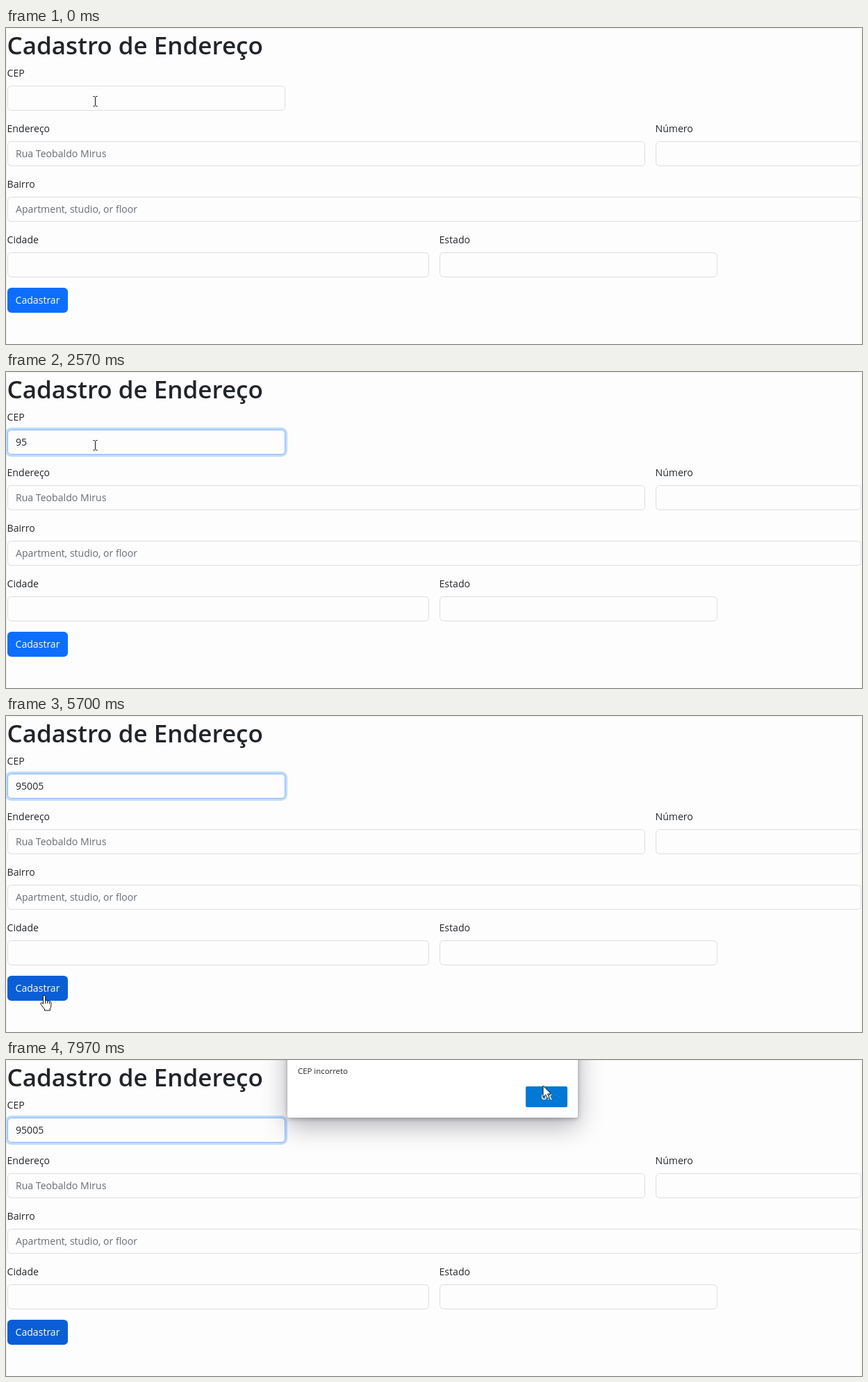
An HTML page for the animation above (8 s loop, 1232 px wide and 455 px high).

```html
<!DOCTYPE html>
<html lang="pt-BR">
<head>
<meta charset="utf-8">
<title>Cadastro de Endereço</title>
<style>
  html, body { margin: 0; width: 100%; height: 100%; overflow: hidden; background: #fdfdfd; }
  svg { position: absolute; left: 0; top: 0; }
  text { font: 14.1px "Open Sans", "Noto Sans", sans-serif; fill: #212529; }
  .title { font-size: 35px; font-weight: 600; }
  .hint { fill: #666d74; }
  .light { fill: #fff; }
  .field { fill: #fdfdfd; stroke: #dcdedf; }
  #dialog {
    position: absolute; left: 405px; top: -40px; width: 418px; height: 123px;
    background: #fff; border-radius: 3px;
    box-shadow: 0 12px 36px rgba(0, 0, 30, .3), 0 2px 6px rgba(0, 0, 0, .28);
  }
  #dialog svg { top: 40px; }
  #dialog text { font-size: 11.4px; }
  #dialog .light { font-size: 10.6px; font-weight: 700; }
</style>
</head>
<body>
<svg id="page" width="1232" height="455"></svg>
<div id="dialog">
  <svg width="418" height="83">
    <text x="15" y="20">CEP incorreto</text>
    <rect x="343" y="38" width="60" height="30" rx="2" fill="#0078d4"/>
    <text class="light" x="373" y="57" text-anchor="middle">OK</text>
  </svg>
</div>
<svg width="1232" height="455">
  <g id="cursor" stroke-linejoin="round">
    <path id="beam" d="M-3-7H-1L0-6 1-7H3M0-6V6M-3 7H-1L0 6 1 7H3" fill="none" stroke="#111"/>
    <path id="arrow" d="M0 0V16.5L3.8 12.9 6.3 18.6 9 17.4 6.5 11.9H11.6Z" fill="#fff" stroke="#111"/>
    <g id="hand" stroke="#111">
      <path d="M-1.5 11.5V.8a1.6 1.6 0 0 1 3.2 0V7.2q0-1.2 1.5-1t1.5 1.6q0-1 1.4-.8t1.4 1.6q.2-.9 1.3-.6t1.1 1.6V14q0 2.5-1.5 4.2V21H.5V19Q-1.5 17-3 14.5L-5 11.8q-.6-1.6.8-1.9t2.7 1.6z" fill="#fff"/>
      <path d="M1.7 7V11M4.7 8V11M7.5 8.6V11.5" fill="none"/>
    </g>
  </g>
</svg>
<script>
const LOOP = 8000, FOCUS = 500, ALERT = 6050;
const $ = id => document.getElementById(id);

// label, x, y, width, placeholder
const fields = [
  ['CEP', 2.5, 83.5, 399, ''],
  ['Endereço', 2.5, 163.5, 917, 'Rua Teobaldo Mirus'],
  ['Número', 935.5, 163.5, 295, ''],
  ['Bairro', 2.5, 243.5, 1228, 'Apartment, studio, or floor'],
  ['Cidade', 2.5, 323.5, 606, ''],
  ['Estado', 624.5, 323.5, 399, '']
];
const HEIGHT = 35;
const text = (x, y, s, cls = '') => `<text x="${x}" y="${y}" class="${cls}">${s}</text>`;

$('page').innerHTML =
  '<rect x=".5" y=".5" width="1230" height="480" rx="6" fill="#fdfdfd" stroke="#f1f0e2"/>' +
  text(1.5, 38, 'Cadastro de Endereço', 'title') +
  fields.map(([label, x, y, w, hint]) =>
    text(x - 1, y - 13.5, label) +
    `<rect class="field" x="${x}" y="${y}" width="${w}" height="${HEIGHT}" rx="5"/>` +
    text(x + 11.5, y + 22.5, hint, 'hint')).join('') +
  `<g id="ring" fill="none">
    <rect x=".5" y="81.5" width="403" height="39" rx="7" stroke="#bfdbfe" stroke-width="3"/>
    <rect x="2.5" y="83.5" width="399" height="35" rx="5" stroke="#86b7fe"/>
  </g>
  <text id="cep" x="14" y="106"></text>
  <rect id="button" x="2" y="374" width="87" height="36" rx="5.6"/>` +
  text(13.5, 397, 'Cadastrar', 'light');

const keys = [[1700, '9'], [1900, '5'], [2900, '0'], [3300, '0'], [3800, '5']];

// time, x, y of the pointer
const path = [
  [0, 128.5, 105.5], [4620, 128.5, 105.5], [4960, 98, 431], [5080, 92, 421], [5350, 55, 403],
  [5750, 55, 403], [5820, 55, 401], [6800, 55, 401], [7450, 773, 37], [LOOP, 773, 37]
];

const clamp = v => Math.max(0, Math.min(1, v));
const ease = v => v * v * (3 - 2 * v);
const inside = (px, py, x, y, w) => px >= x && px <= x + w && py >= y && py <= y + HEIGHT;

function pointer(t) {
  const i = path.findIndex(p => p[0] > t);
  const [t0, x0, y0] = path[i - 1], [t1, x1, y1] = path[i];
  const k = ease((t - t0) / (t1 - t0));
  return [x0 + (x1 - x0) * k, y0 + (y1 - y0) * k];
}

function draw() {
  const t = performance.now() % LOOP;
  const [x, y] = pointer(t);
  const modal = t >= ALERT;
  const onButton = inside(x, y, 2, 374, 87);
  const onField = fields.some(f => inside(x, y, f[1], f[2], f[3]));
  const shape = onButton ? 'hand' : onField && !modal ? 'beam' : 'arrow';

  for (const id of ['hand', 'beam', 'arrow']) $(id).style.display = id === shape ? '' : 'none';
  $('cursor').setAttribute('transform', `translate(${x.toFixed(1)} ${y.toFixed(1)})`);
  $('button').setAttribute('fill', onButton || modal ? '#0b5ed7' : '#0d6efd');
  $('ring').style.opacity = ease(clamp((t - FOCUS) / 150));
  $('cep').textContent = keys.filter(k => t >= k[0]).map(k => k[1]).join('');
  $('dialog').style.display = modal ? '' : 'none';
  requestAnimationFrame(draw);
}
draw();
</script>
</body>
</html>
```
